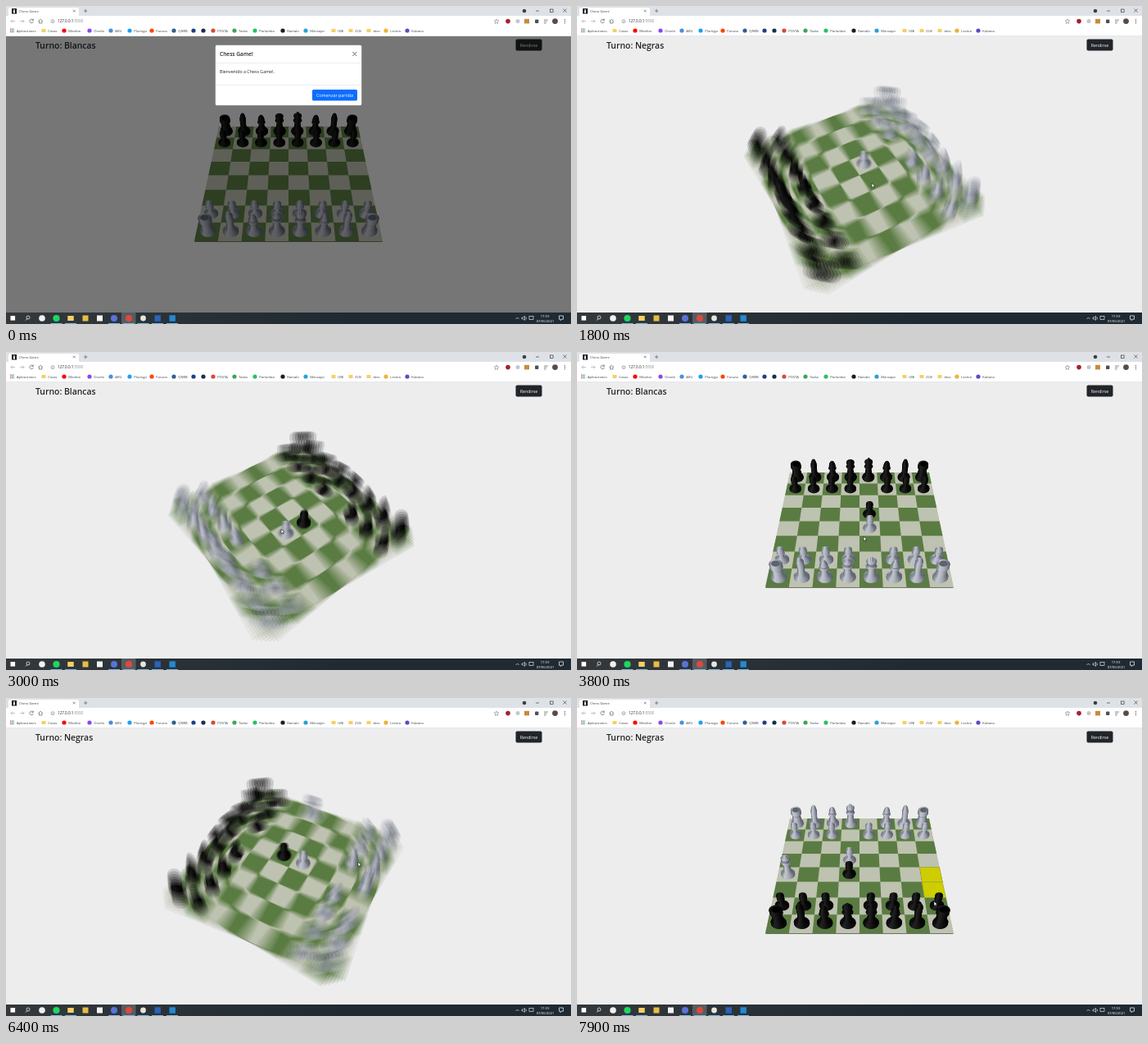
An HTML page with a canvas that plays this animation: 690x388 px, repeating every 8000 ms.

```html
<!DOCTYPE html>
<html lang="es">
<head>
<meta charset="utf-8">
<title>Chess Game</title>
<style>
html, body { margin: 0; width: 690px; height: 388px; overflow: hidden; background: #ededed; }
canvas, svg { position: absolute; left: 0; top: 0; }
text { font-family: "Open Sans", "Noto Sans", sans-serif; white-space: pre; }
</style>
</head>
<body>
<canvas id="view" width="690" height="388"></canvas>
<svg id="ui" width="690" height="388" viewBox="0 0 690 388"></svg>
<script>
const LOOP = 8000, W = 690, H = 388;
const clamp = v => Math.max(0, Math.min(1, v));
const square = name => [name.charCodeAt(0) - 97, name[1] - 1];

// ---------- timeline ----------
const TURN_MS = 900;
const turns = [1210, 2370, 6090];
const moves = [[1200, 'e2', 'e4'], [2360, 'e7', 'e5'], [6080, 'd1', 'h5']];
const hints = [
  [1000, 1190, 'e3 e4'], [2200, 2350, 'e6 e5'], [4600, 5250, 'g3 g4'],
  [5500, 6070, 'e2 f3 g4 h5'], [7600, 8000, 'a6 a5']
];
const mouse = [
  [0, 700, 230], [400, 406, 107], [820, 406, 107], [1000, 359, 248], [1180, 357, 212],
  [1800, 360, 216], [2100, 350, 225], [2220, 331, 247], [2350, 333, 211], [3000, 336, 216],
  [3800, 350, 225], [4600, 413, 247], [5200, 413, 247], [5500, 331, 264], [5950, 429, 198],
  [6400, 430, 200], [7100, 425, 220], [7600, 436, 248], [8000, 436, 248]
];

// ---------- pieces: radius, height pairs in hundredths ----------
const profiles = {
  P: [8, 0, 8, 2, 6, 4, 3, 6, 2.5, 11, 4.5, 12, 2.5, 13, 4, 14.5, 4.5, 16.5, 4, 18.5, 1.5, 20],
  R: [8.5, 0, 8.5, 3, 6.5, 6, 5.3, 16, 7, 18, 7, 24.5],
  N: [8.5, 0, 8.5, 3, 6, 5, 4.5, 11, 5, 18, 5, 25, 2.5, 31],
  B: [8.5, 0, 8.5, 3, 5, 6, 3, 15, 5.5, 17, 3, 18, 4.5, 21, 3, 26, 1, 29],
  Q: [8.5, 0, 8.5, 3, 5, 6, 3.2, 18, 6, 20, 3.5, 21, 5.5, 27, 2, 29, 2, 31],
  K: [8.5, 0, 8.5, 3, 5, 6, 3.4, 18, 6, 20, 3.8, 22, 5.5, 28, 1.5, 29, 1.5, 34]
};
const slices = {};
for (const kind in profiles) {
  const p = profiles[kind], list = slices[kind] = [];
  for (let i = 0; i < p.length - 2; i += 2) {
    const n = Math.ceil(p[i + 3] - p[i + 1]), under = p[i + 2] > p[i] + 0.5;
    for (let j = 0; j < n; j++) {
      const u = j / n;
      list.push([(p[i] + (p[i + 2] - p[i]) * u) / 100, (p[i + 1] + (p[i + 3] - p[i + 1]) * u) / 100, under]);
    }
  }
}
const pieces = [];
[...'RNBQKBNR'].forEach((kind, col) => pieces.push(
  { kind, col, row: 0, white: true }, { kind: 'P', col, row: 1, white: true },
  { kind: 'P', col, row: 6 }, { kind, col, row: 7 }));
for (const [time, from, to] of moves) {
  const [c, r] = square(from);
  pieces.find(p => p.col === c && p.row === r).move = { time, to: square(to) };
}

// ---------- scene ----------
const screen = view.getContext('2d');
const buffer = document.createElement('canvas');
buffer.width = W; buffer.height = H;
const g = buffer.getContext('2d');

function shade(...colors) {
  const grad = g.createLinearGradient(-1, 0, 1, 0);
  colors.forEach((c, i) => grad.addColorStop(i / (colors.length - 1), c));
  return grad;
}
const whiteFill = shade('#6c727e', '#c3c7d0', '#b0b4be', '#8d929d', '#555b67');
const whiteUnder = shade('#4b505b', '#8b909b', '#7d828d', '#666b76', '#434853');
const blackFill = shade('#040404', '#222', '#161616', '#090909', '#020202');

const angleAt = t => turns.reduce((sum, start) => sum + Math.PI * clamp((t - start) / TURN_MS), 0);

// The camera comes nearer and higher halfway through each turn.
function camera(t) {
  const a = angleAt(t), sin = Math.sin(a), cos = Math.cos(a), lift = Math.abs(sin);
  const back = 3.4 - 0.9 * lift, up = 3.33 + 0.17 * lift, dist = Math.hypot(back, up);
  const s = up / dist, c = back / dist;
  const project = (x, z, h = 0) => {
    const X = x * cos - z * sin, Z = x * sin + z * cos, k = 465 / (dist + Z * c - h * s);
    return [345 + X * k, 206.5 - (Z * s + h * c) * k, k, Z];
  };
  return { project, s };
}

function quad(cam, x, z, size, color, h = 0) {
  g.fillStyle = color;
  g.beginPath();
  for (const [dx, dz] of [[0, 0], [1, 0], [1, 1], [0, 1]])
    g.lineTo(...cam.project(x + dx * size, z + dz * size, h).slice(0, 2));
  g.fill();
}

function disc(x, y, rx, ry, fill) {
  g.setTransform(rx, 0, 0, ry, x, y);
  g.fillStyle = fill;
  g.beginPath();
  g.arc(0, 0, 1, 0, 7);
  g.fill();
}

function drawPiece(cam, p) {
  const knight = p.kind === 'N', forward = p.white ? 1 : -1;
  for (const [r, h, under] of slices[p.kind]) {
    const neck = knight && h > 0.05;
    const lean = neck ? forward * 0.03 * Math.sin((h - 0.05) * 12) : 0;
    const [x, y, k] = cam.project(p.x, p.z + lean, h);
    const fill = p.white ? (under ? whiteUnder : whiteFill) : blackFill;
    disc(x, y, r * k * (neck ? 0.8 : 1), r * k * cam.s, fill);
  }
  if (p.kind === 'R') {
    const [x, y, k] = cam.project(p.x, p.z, 0.24);
    disc(x, y, 0.045 * k, 0.045 * k * cam.s, p.white ? '#5d626c' : '#000');
  }
  g.setTransform(1, 0, 0, 1, 0, 0);
}

function drawScene(t) {
  const cam = camera(t);
  g.fillStyle = '#ededed';
  g.fillRect(0, 0, W, H);
  quad(cam, -1, -1, 2, '#6c7360', -0.015);
  quad(cam, -1, -1, 2, '#bec2b0');
  for (let i = 0; i < 64; i++) {
    const col = i % 8, row = i >> 3;
    if ((col + row) % 2 === 0) quad(cam, col / 4 - 1, row / 4 - 1, 0.25, '#5a7c42');
  }
  for (const [from, to, names] of hints) {
    if (t < from || t >= to) continue;
    for (const name of names.split(' ')) {
      const [col, row] = square(name);
      quad(cam, col / 4 - 1, row / 4 - 1, 0.25, '#a5a510');
      quad(cam, col / 4 - 0.995, row / 4 - 0.995, 0.24, '#cdcd00');
    }
  }
  pieces.map(p => {
    let { col, row } = p;
    if (p.move) {
      const u = clamp((t - p.move.time) / 90 + 1);
      col += (p.move.to[0] - col) * u;
      row += (p.move.to[1] - row) * u;
    }
    const x = (col - 3.5) / 4, z = (row - 3.5) / 4;
    return { ...p, x, z, depth: cam.project(x, z)[3] };
  }).sort((a, b) => b.depth - a.depth).forEach(p => drawPiece(cam, p));
}

// Blend several moments while the board turns.
function renderBoard(t) {
  const turning = angleAt(t - 24) !== angleAt(t + 24);
  const copies = turning ? 7 : 1;
  for (let i = 0; i < copies; i++) {
    drawScene(turning ? t + (i - 3) * 8 : t);
    screen.globalAlpha = 1 / (i + 1);
    screen.drawImage(buffer, 0, 0);
  }
}

// ---------- browser, page texts and task bar ----------
const rect = (x, y, w, h, fill, more = '') => `<rect x="${x}" y="${y}" width="${w}" height="${h}" fill="${fill}" ${more}/>`;
const dot = (x, y, r, fill) => `<circle cx="${x}" cy="${y}" r="${r}" fill="${fill}"/>`;
const line = (d, color = '#5f6368', w = 0.7) => `<path d="${d}" fill="none" stroke="${color}" stroke-width="${w}"/>`;
const text = (x, y, size, str, fill = '#3c4043', more = '') => `<text x="${x}" y="${y}" font-size="${size}" fill="${fill}" ${more}>${str}</text>`;
const folder = (x, y, s = 1) => rect(x - 2.5 * s, y - 2 * s, 5 * s, 4 * s, '#f6cf62', 'rx=".5"');

function tabs() {
  return rect(0, 0, W, 12, '#dee1e6') + rect(3, 2, 86, 11, '#fff', 'rx="2"') +
    rect(7, 3, 6, 6.5, '#161616') + dot(10, 5, 0.9, '#fff') + rect(9, 6, 2, 2.5, '#fff') +
    text(16, 7.7, 4.1, 'Chess Game') +
    line('M82 4.7l2.6 2.6m0-2.6l-2.6 2.6M95 6h4.4M97.2 3.8v4.4') +
    dot(633, 6, 2.3, '#3c4043') + line('M647 6h4M680.5 3.5l4 4m0-4l-4 4', '#222', 0.6) +
    rect(664.5, 4, 3.6, 3.6, 'none', 'stroke="#222" stroke-width=".6"');
}

function toolbar() {
  return rect(0, 12, W, 25, '#fff') +
    line('M11 18.5H6m2-2l-2 2 2 2M17 18.5h5m-2-2l2 2-2 2', '#aaa') +
    line('M33 17a2.3 2.3 0 1 0 .4 2M33.3 15.5v2h-2') +
    line('M39.5 18.5l2.7-2.3 2.7 2.3m-4.4-.5v3h3.4v-3') +
    '<circle cx="57" cy="18.7" r="2" fill="none" stroke="#7a7f85" stroke-width=".6"/>' + rect(56.7, 17.7, 0.6, 2, '#7a7f85') +
    `<text x="63" y="20.4" font-size="4.6" fill="#202124">127.0.0.1<tspan fill="#80868b">:5500</tspan></text>` +
    line('M599 16l.8 1.8 2 .2-1.5 1.4.4 2-1.7-1-1.7 1 .4-2-1.5-1.4 2-.2z', '#5f6368', 0.5) +
    dot(613, 18.6, 2.8, '#a5222b') + dot(625, 18.6, 2.5, '#c3c6ca') + rect(633, 15.8, 6, 5.6, '#c98a3c') +
    rect(646, 16.5, 4.4, 4.4, '#4c5156', 'rx="1"') + line('M657 17h5m-5 2h3.5m-3.5 2h2.5') +
    dot(670.5, 18.6, 3.4, '#5b4a45') + [16.6, 18.7, 20.8].map(y => dot(682.5, y, 0.6, '#444')).join('');
}

function bookmarks() {
  const items = [
    [46, '', 'Cosas'], [71, '#f00', 'Mirafon'], [102, '#8d45f0', 'Orvelo'], [128, '#4a8fd8', 'ARU'],
    [151, '#1da1f2', 'Plumigo'], [178, '#ff4500', 'Foruna'], [205, '#2f5f94', 'QNRB'], [229, '#1d3f88', ''],
    [241, '#14304e', ''], [253, '#d9483b', 'POSTA'], [279, '#41a35a', 'Tazka'], [304, '#25c35e', 'Parlumbo'],
    [338, '#1b1f23', 'Ramalo'], [366, '#2aa0dc', 'Mensajor'], [400, '', 'UNI'], [421, '', 'ZUV'],
    [443, '', 'desc'], [464, '#f0b232', 'Lectiro'], [490, '#6546c4', 'Kubano']
  ];
  let out = text(13, 31.5, 4.1, 'Aplicaciones');
  for (let i = 0; i < 9; i++)
    out += rect(5 + i % 3 * 1.8, 27.4 + (i / 3 | 0) * 1.8, 1.2, 1.2, ['#e25444', '#4285f4', '#46a35b'][i % 3]);
  for (const [x, color, name] of items)
    out += (color ? dot(x, 30, 2.6, color) : folder(x, 30)) + text(x + 5.3, 31.5, 4.1, name);
  return out + rect(0, 36.4, W, 0.6, '#d5d7da');
}

function page() {
  return text(36, 52, 10.4, '', '#212529', 'id="turn" font-weight="600"') +
    rect(622.5, 40.5, 32, 14, '#212529', 'rx="1.8"') + text(638.5, 49.5, 5.2, 'Rendirse', '#fff', 'text-anchor="middle"');
}

function modal() {
  return '<g id="modal">' + rect(0, 37, W, 337, '#000', 'opacity=".5"') +
    rect(255.5, 47.5, 179, 74, '#fff', 'rx="2" stroke="#555" stroke-width=".4"') +
    text(261, 61, 6.6, 'Chess Game!', '#212529', 'font-weight="600"') +
    line('M423.3 56l5 5m0-5l-5 5', '#555', 0.9) +
    rect(256, 69.5, 178, 0.6, '#dee2e6') + rect(256, 96, 178, 0.6, '#dee2e6') +
    text(261, 82, 5.3, 'Bienvenido a Chess Game!.', '#212529') +
    rect(374, 102, 55, 13.5, '#0d6efd', 'rx="1.6"') +
    text(401.5, 110.6, 5.4, 'Comenzar partida', '#fff', 'text-anchor="middle"') + '</g>';
}

function taskbar() {
  let out = '<linearGradient id="bar"><stop stop-color="#34383b"/><stop offset=".6" stop-color="#1f2a32"/></linearGradient>' +
    rect(0, 374, W, 14, 'url(#bar)') + rect(141, 374, 17.5, 14, '#565c60') +
    rect(5.5, 378, 5.6, 5.6, '#fff') + line('M24 383.5l2-2', '#fff', 0.8) +
    '<circle cx="27" cy="380" r="2" fill="none" stroke="#fff" stroke-width=".7"/>' +
    dot(44, 381, 3.8, '#f1f1f1') + dot(61.5, 381, 4.1, '#1ed760') + folder(79, 381, 1.5) +
    rect(93.5, 377.5, 7, 7, '#e8bd45') + rect(111, 377.5, 7, 7, '#f3f3f3') + dot(132, 381, 4, '#5b72d8') +
    dot(150, 381, 4.1, '#dc4a3d') + dot(167.5, 381, 3.4, '#e9e5d8') +
    rect(181.5, 377.3, 7.4, 7.4, '#2b63b8') + rect(199.5, 377.3, 7.4, 7.4, '#2489d4');
  for (const x of [61.5, 79, 132, 150, 167.5, 185, 203]) out += rect(x - 7, 387, 14, 1, '#76b9ed');
  return out + line('M622.5 382l2-2 2 2M630 380h1.5l2-1.6v5l-2-1.6H630zm5-.5q1 1.5 0 3', '#fff', 0.6) +
    rect(639, 378.5, 5, 4, 'none', 'stroke="#fff" stroke-width=".6"') +
    text(658, 379.8, 4.2, '17:59', '#fff', 'text-anchor="middle"') +
    text(658.5, 386, 4.1, '07/06/2021', '#fff', 'text-anchor="middle"') +
    line('M675.5 378h5v4.2h-2l-1.3 1.5v-1.5h-1.7z', '#fff', 0.7);
}

ui.innerHTML = page() + modal() + tabs() + toolbar() + bookmarks() + taskbar() +
  '<path id="pointer" d="M0 0v5.6l1.3-1.2.9 1.9.9-.4-.9-1.9h1.8z" fill="#fff" stroke="#000" stroke-width=".5"/>';
const part = id => document.getElementById(id);
const turnText = part('turn'), dialog = part('modal'), pointer = part('pointer');

function frame(now) {
  const t = now % LOOP;
  renderBoard(t);
  const black = turns.filter(start => t >= start).length % 2;
  turnText.textContent = 'Turno: ' + (black ? 'Negras' : 'Blancas');
  dialog.setAttribute('opacity', 1 - clamp((t - 500) / 120));
  const i = mouse.findIndex(m => m[0] > t), [t0, x0, y0] = mouse[i - 1], [t1, x1, y1] = mouse[i];
  const u = (t - t0) / (t1 - t0), e = u * u * (3 - 2 * u);
  pointer.setAttribute('transform', `translate(${x0 + (x1 - x0) * e} ${y0 + (y1 - y0) * e})`);
  requestAnimationFrame(frame);
}
requestAnimationFrame(frame);
</script>
</body>
</html>
```
